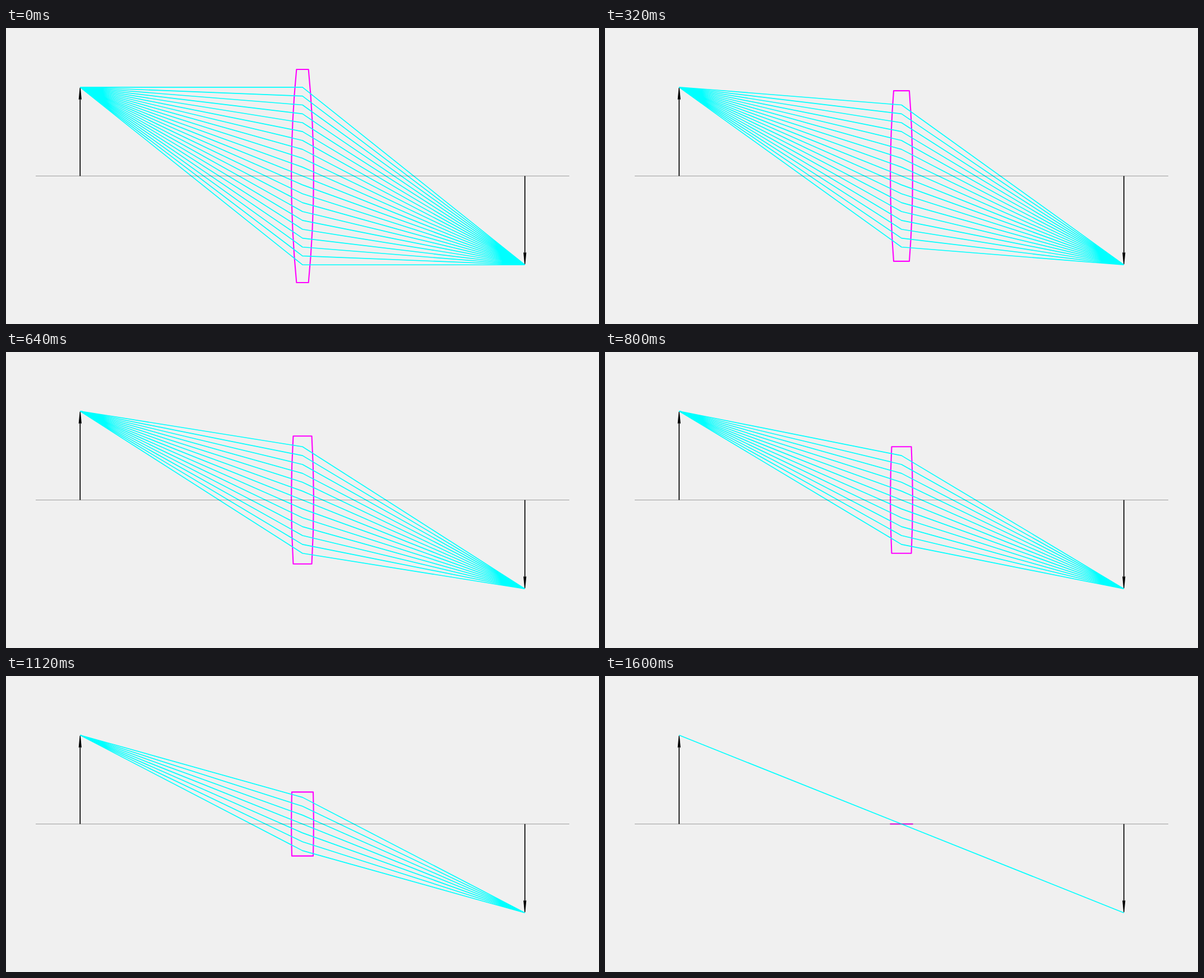
Recreate the animation shown at these times as an HTML page. Size 1058 px wide and 529 px high, loop 2200 ms.

```html
<!DOCTYPE html>
<html lang="en">
<head>
<meta charset="utf-8">
<title>Lens aperture</title>
<style>
  html, body { margin: 0; width: 100%; height: 100%; overflow: hidden; background: #f0f0f0; }
  svg { display: block; width: 100vw; height: 100vh; }
</style>
</head>
<body>
<svg viewBox="0 0 1058 529">
  <rect width="1058" height="529" fill="#f0f0f0"/>
  <g id="arrows"></g>
  <path id="lens" fill="none" stroke="#f0f" stroke-width="2.1" stroke-linejoin="round"/>
  <path id="rays" fill="none" stroke="#0ff" stroke-width="1.65" stroke-linejoin="round"/>
  <path d="M53 264.5H1005" stroke="#000" stroke-opacity=".34" stroke-width="1"/>
</svg>
<script>
const CX = 529, CY = 264.5;
const UNIT = 79.35;
const REACH = 5 * UNIT;        // object and image distance
const HEIGHT = 2 * UNIT;       // arrow length
const HALF_THICK = UNIT / 4;
const RADIUS = 25 * UNIT;      // curvature of both lens faces
const GAP = HEIGHT / 10;       // distance between rays at the lens
const STEPS = 20, STEP_MS = 80, LOOP_MS = 2200;

const get = id => document.getElementById(id);

function arrow(x, dir) {
  const tip = CY + dir * HEIGHT;
  const base = tip - dir * 22;
  return `<path d="M${x} ${CY}V${base}" stroke="#000" stroke-width="1.7"/>
    <path d="M${x - 2.6} ${base}L${x - 0.6} ${tip - dir}H${x + 0.6}L${x + 2.6} ${base}Z"/>`;
}

function lensPath(half) {
  const sag = RADIUS - Math.sqrt(RADIUS * RADIUS - half * half);
  const w = HALF_THICK - sag;
  const top = CY - half, bottom = CY + half;
  const arc = `A${RADIUS} ${RADIUS} 0 0 `;
  return `M${CX - w} ${top}H${CX + w}${arc}1 ${CX + w} ${bottom}` +
    `H${CX - w}${arc}1 ${CX - w} ${top}Z`;
}

function rayPath(count) {
  let d = '';
  for (let i = 0; i < count; i++) {
    const y = CY + (i - (count - 1) / 2) * GAP;
    d += `M${CX - REACH} ${CY - HEIGHT}L${CX} ${y}L${CX + REACH} ${CY + HEIGHT}`;
  }
  return d;
}

function draw(ms) {
  const step = Math.min(STEPS, Math.floor((ms % LOOP_MS) / STEP_MS));
  const left = STEPS - step;
  get('lens').setAttribute('d', lensPath(2.4 * UNIT * left / STEPS));
  get('rays').setAttribute('d', rayPath(left + 1));
}

get('arrows').innerHTML = arrow(CX - REACH, -1) + arrow(CX + REACH, 1);

const start = performance.now();
function tick() {
  draw(performance.now() - start);
  requestAnimationFrame(tick);
}
tick();
</script>
</body>
</html>
```
